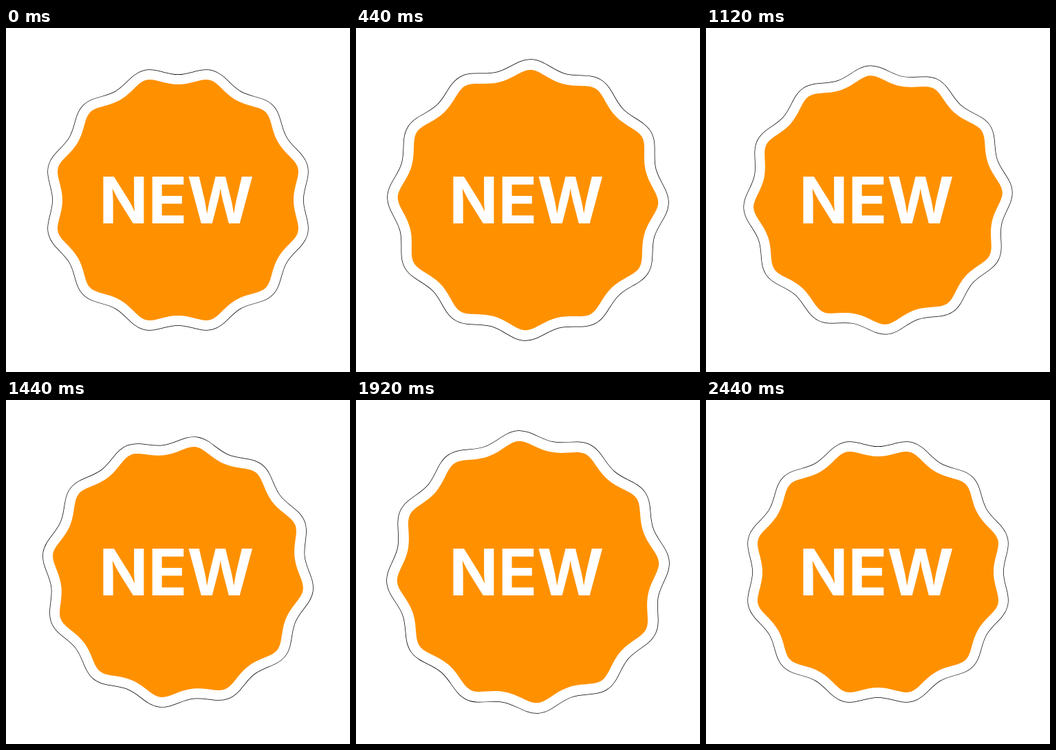
Animation of 500x500 px, one loop 2480 ms. Source, as an HTML page without scripts:

```html
<!DOCTYPE html>
<html lang="en">
<head>
<meta charset="utf-8">
<title>New badge</title>
<style>
  @property --turn {
    syntax: "<number>";
    inherits: true;
    initial-value: 0;
  }
  html, body {
    margin: 0;
    width: 100%;
    height: 100%;
    overflow: hidden;
    background: #fff;
  }
  svg { display: block; width: 100%; height: 100%; }

  /* One stepped progress value drives both the quarter turn and the two pulses. */
  .badge {
    animation: spin 2480ms steps(62, jump-none) infinite;
    transform: rotate(calc(var(--turn) * 90deg))
               scale(calc(1.03 - 0.03 * cos(var(--turn) * 720deg)));
  }
  @keyframes spin {
    from { --turn: 0; }
    to { --turn: 1; }
  }
  .edge { stroke: #000; stroke-width: 29.4; }
  .rim { stroke: #fff; stroke-width: 28; }
  .face { fill: #ff9100; }
  text { font: 700 93.5px Inter, "Liberation Sans", sans-serif; fill: #fff; }
</style>
</head>
<body>
<svg viewBox="0 0 500 500">
  <defs>
    <path id="seal" d="M0-168
      C20-168 34.6-177.6 46.7-174.3 S66.7-155.5 84-145.5 S118.8-136.4 127.6-127.6
      S135.5-101.3 145.5-84 S171.1-58.8 174.3-46.7 S168-20 168 0
      S177.6 34.6 174.3 46.7 S155.5 66.7 145.5 84 S136.4 118.8 127.6 127.6
      S101.3 135.5 84 145.5 S58.8 171.1 46.7 174.3 S20 168 0 168
      S-34.6 177.6-46.7 174.3 S-66.7 155.5-84 145.5 S-118.8 136.4-127.6 127.6
      S-135.5 101.3-145.5 84 S-171.1 58.8-174.3 46.7 S-168 20-168 0
      S-177.6-34.6-174.3-46.7 S-155.5-66.7-145.5-84 S-136.4-118.8-127.6-127.6
      S-101.3-135.5-84-145.5 S-58.8-171.1-46.7-174.3 S-20-168 0-168Z"/>
  </defs>
  <g transform="translate(250 250)">
    <g class="badge">
      <use href="#seal" class="edge"/>
      <use href="#seal" class="rim"/>
      <use href="#seal" class="face"/>
    </g>
  </g>
  <text x="135.2" y="284">NEW</text>
</svg>
</body>
</html>
```
